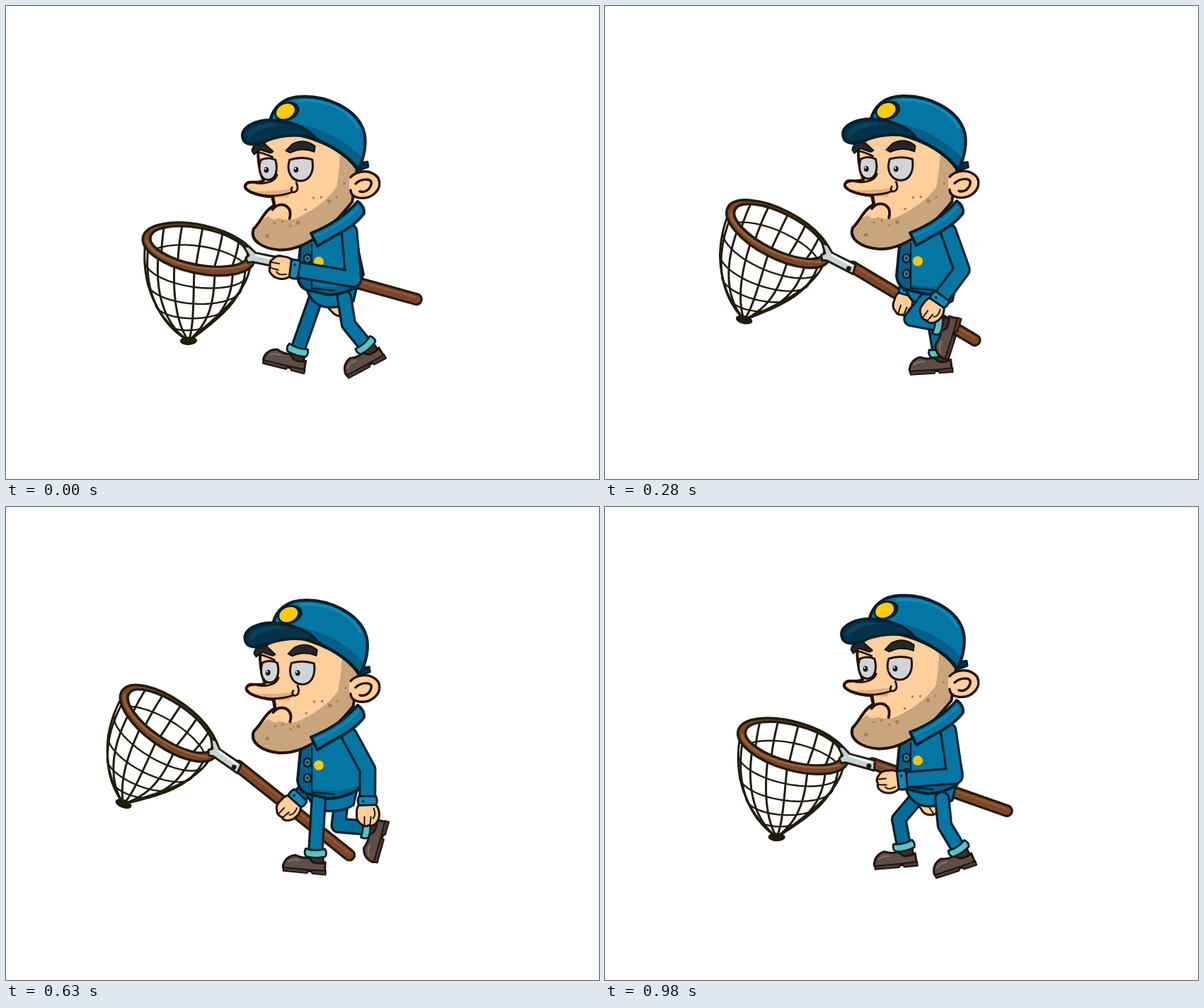
Animation, 838 px wide and 668 px high, one loop 1.05 s. Source, as an HTML page with a canvas:

```html
<!DOCTYPE html>
<html lang="en">
<head>
<meta charset="utf-8">
<title>Walking net man</title>
<style>
  html, body { margin: 0; width: 100%; height: 100%; overflow: hidden; background: #fff; }
  canvas { display: block; }
</style>
</head>
<body>
<canvas id="stage" width="838" height="668"></canvas>
<script>
const c = document.getElementById('stage').getContext('2d');
const STEP = 70, COUNT = 15, TAU = Math.PI * 2, RAD = Math.PI / 180;
const INK = '#06202c', BROWN = '#25120a', OLIVE = '#211d0b';
const BLUE = '#0476a4', LIGHT = '#1388b6', DEEP = '#045f89', NAVY = '#03324a';
const SKIN = '#fece9b', TAN = '#c9a57d', TEAL = '#5fc1bd', SHOE = '#5e4e48', WOOD = '#7d4628';

function draw(d, fill, line, width = 3) {
  const p = typeof d === 'string' ? new Path2D(d) : d;
  if (fill) { c.fillStyle = fill; c.fill(p, 'evenodd'); }
  if (line) { c.strokeStyle = line; c.lineWidth = width; c.stroke(p); }
}

function oval(x, y, rx, ry, deg, fill, line, width) {
  const p = new Path2D();
  p.ellipse(x, y, rx, ry, deg * RAD, 0, TAU);
  draw(p, fill, line, width);
}

function inside(clip, body) {
  c.save();
  c.clip(clip);
  body();
  c.restore();
}

function at(x, y, angle, body) {
  c.save();
  c.translate(x, y);
  c.rotate(angle);
  body();
  c.restore();
}

// Outlined tube, used for limbs and the handle
function tube(points, width, fill, line) {
  const d = 'M' + points.map(p => p.join()).join('L');
  draw(d, null, line, width);
  draw(d, null, fill, width - 6.5);
}

// Point on the bag: u goes round the rim, v runs from rim to tip
function bag(u, v) {
  const r = 1 - v ** 2.3, tilt = 0.34 * (1 - v);
  const x = 76 * r * Math.cos(u), y = 30 * r * Math.sin(u);
  return [262 - 32 * v + x * Math.cos(tilt) - y * Math.sin(tilt),
          338 + 128 * v + x * Math.sin(tilt) + y * Math.cos(tilt)];
}

function strand(point, width) {
  const pts = Array.from({ length: 25 }, (_, i) => point(i / 24).join());
  draw('M' + pts.join('L'), null, OLIVE, width);
}

function mesh(start, rows) {
  for (let i = 0; i <= 8; i++) strand(s => bag(start + Math.PI * i / 8, s), 3);
  for (const v of rows) strand(s => bag(start + Math.PI * s, v), 2.4);
}

function net(swing, bob) {
  const x = 258 - 115 * swing, y = 477 - 20 * swing - 65 * swing ** 2 + bob;
  at(x, y, (28.9 * swing - 7.9) * RAD, () => {
    c.translate(-230, -466);
    tube([[372, 372], [557, 452]], 18, WOOD, OLIVE);
    draw('M380 373L556 449', null, '#955834', 2.5);
    mesh(0, [0.2, 0.4, 0.6, 0.79]);
    oval(230, 466, 12, 6, 5, OLIVE);

    const hole = new Path2D(), ring = new Path2D();
    hole.ellipse(263, 336, 70, 26, 0.33, 0, TAU);
    ring.ellipse(262, 339.5, 80.5, 34, 0.35, 0, TAU);
    ring.addPath(hole);
    inside(hole, () => {
      c.fillStyle = '#fff';
      c.fillRect(180, 290, 170, 100);
      mesh(Math.PI, [0.2, 0.42]);
    });
    draw(ring, WOOD, OLIVE, 3.6);
    draw('M191 318C196 347 270 380 326 371', null, '#98603c', 3);

    draw('M325 344L333 346 341 356 376 368 374 382 335 368 328 368 326 361 331 358Z', '#c6d1d3', OLIVE, 3);
    draw('M341 359L370 370', null, '#f1f6f6', 3);
    oval(367, 375, 3.5, 3.5, 0, OLIVE);
  });
}

function hand(x, y, ex, ey) {
  at(x, y, Math.atan2(y - ey, x - ex), () => {
    draw('M-14 -11C-6 -19 6 -18 12 -13Q18 -9 16 -2Q19 4 14 9Q10 16 0 15Q-9 16 -14 11Z', SKIN, BROWN, 3);
    draw('M15 -4L4 -5M16 4L4 4M-8 -9Q2 -13 6 -8', null, BROWN, 2);
    draw('M-25 -12Q-19 -15 -13 -12L-12 12Q-19 15 -25 12Z', LIGHT, INK, 3);
    oval(-18, 6, 2, 2, 0, NAVY);
  });
}

// First half of the cycle swings the foot forward, second half pushes it back
function footstep(p) {
  if (p < 0.5) {
    const q = p * 2, lift = Math.sin(Math.PI * q ** 0.75) ** 1.5;
    return [460 + 48 * Math.cos(Math.PI * q) + 15 * Math.sin(Math.PI * q),
            479 + 7 * q - 38 * lift, 42 * q - 28 - 75 * lift];
  }
  const s = p * 2 - 1;
  return [412 + 96 * s * (1.4 - 0.4 * s),
          486 - 7 * s + 6 * Math.sin(Math.PI * s), 14 * (1 - s) ** 4 - 28 * s ** 3];
}

function leg(p, fill) {
  const [ax, ay, deg] = footstep(p);
  const hx = 458 + 20 * Math.cos(TAU * p), hy = 412, bone = 38;
  const dx = ax - hx, dy = ay - hy, d = Math.hypot(dx, dy);
  const bend = Math.sqrt(Math.max(0, bone ** 2 - d * d / 4)) / d;
  const kx = (hx + ax) / 2 - dy * bend, ky = (hy + ay) / 2 + dx * bend;

  tube([[hx, hy], [kx, ky], [ax, ay]], 22.5, fill, INK);
  at(ax, ay, deg * RAD, () => {
    draw('M-9 3L11 3 13 18-13 18Z', '#3c2f2b', BROWN, 3);
    draw('M-9 8Q-18 10-28 6Q-42 9-44 23L-43 27 16 27 15 12Q8 16-2 14Z', SHOE, BROWN, 3);
    draw('M-43 25L-43 30-9 30-8 27-3 27-2 30 17 30 17 24-6 25Z', '#4a3a35', BROWN, 2);
    draw('M-37 16Q-30 11-22 13', null, '#85736b', 2);
  });
  // The cuff follows the shin
  at(ax, ay, Math.atan2(ay - ky, ax - kx) - Math.PI / 2, () =>
    draw('M-14-5Q0-1 13-6Q17 0 14 5Q0 9-13 6Q-17 1-14-5Z', TEAL, INK, 2.8));
}

const FACE = new Path2D('M358 203C356 222 361 241 365 250C356 255 345 248 339 256C336 262 350 271 378 273' +
  'L380 285C366 291 360 309 350 318C344 334 362 346 386 348C424 350 460 318 490 281' +
  'L497 235C480 210 450 195 415 186C390 183 370 190 358 203Z');
const STUBBLE = new Path2D('M340 320L371 300Q376 308 386 303Q397 308 410 304Q450 286 468 260' +
  'Q474 230 473 200L510 220 510 360 340 360Z');
const CAP = new Path2D('M375 166C379 148 393 132 421 132C456 131 495 150 506 178C513 196 507 220 499 236' +
  'C484 214 458 200 420 183Z');
const EYES = 'M361 221Q372 216 382 221C386 236 382 249 371 249C360 248 357 233 361 221Z' +
  'M402 221Q418 216 434 221C437 240 429 251 417 251C403 250 397 236 402 221Z';

function face() {
  draw(FACE, SKIN);
  inside(FACE, () => {
    draw(STUBBLE, TAN);
    for (let i = 0; i < 11; i++) {
      const r = i % 4 ? 1.8 : 2.8;
      oval(369 + i * 11, 328 - i * 7 + 11 * Math.sin(i * 5), r, r, 0, '#a1835f');
    }
    draw('M340 264Q372 267 404 262L400 274 345 274Z', '#e2ad7c');
  });
  draw(FACE, null, BROWN, 4);
  draw('M382 240C382 253 363 256 350 252L353 263 392 262 400 240Z', SKIN);
  draw(EYES, '#d3d4d7', BROWN, 3);
  for (const x of [369, 411]) {
    oval(x, 235, 3.4, 4, 0, '#171717');
    oval(x - 1.2, 233.5, 1.2, 1.2, 0, '#fff');
  }
  draw('M384 242C381 253 363 256 350 252C340 249 335 258 341 263C356 273 384 274 404 267' +
    'M411 253Q416 265 407 267Q402 266 405 260M352 208Q366 211 378 217', null, BROWN, 2.8);
  draw('M377 291Q384 282 394 285Q405 290 401 304M377 274L379 284', null, BROWN, 3.8);
  draw('M349 208C350 198 361 194 367 198L379 209 375 211 360 206 352 213Z' +
    'M397 208L406 199Q423 190 438 202L437 210Q419 203 403 211Z', '#25262a', '#15100d', 2);
}

function cap() {
  draw('M499 227L512 225 513 232 500 237Z', NAVY, INK, 3);
  draw(CAP, BLUE);
  inside(CAP, () => {
    draw('M412 170C455 178 488 198 512 228L498 250 410 200Z', DEEP);
    draw('M415 138C455 135 487 152 499 176', null, LIGHT, 4);
  });
  draw(CAP, null, INK, 4.4);
  oval(399, 152.5, 18, 13, -20, INK);
  oval(397, 152.5, 13.5, 10, -25, '#fecb09');
  draw('M336 189C332 173 358 162 384 165C411 168 432 179 440 193C421 184 395 185 371 193C351 202 338 200 336 189Z', NAVY, INK, 4);
  draw('M342 185C349 170 376 166 397 172C375 172 354 177 345 191Z', '#05435f');
}

function ear() {
  draw('M485 246C494 237 515 233 526 247C533 262 518 278 498 275C490 273 486 268 485 262Z', SKIN);
  draw('M487 246C495 237 515 233 526 247C533 262 518 278 498 275C490 273 487 269 487 264' +
    'M494 255C503 247 519 247 516 256C514 264 507 268 500 266', null, BROWN, 3.4);
}

function jacket() {
  const shape = new Path2D('M416 344L412 386Q414 401 425 405L455 412Q476 412 497 400L505 383Q500 360 491 318L438 325Z');
  draw(shape, BLUE);
  inside(shape, () => {
    draw('M410 340L430 340 431 410 410 410Z', DEEP);
    draw('M433 398Q463 406 496 394L500 415 430 415Z', DEEP);
  });
  draw(shape, null, INK, 4);
  draw('M432 340L432 402M432 403L464 406', null, INK, 2.4);
  for (const y of [361, 383]) {
    oval(426, y, 5.2, 6, 0, '#44758a', INK, 2.6);
    oval(426, y, 1.6, 1.8, 0, INK);
  }
  oval(442, 365, 7, 7, 0, '#f3c713');
}

function collar() {
  draw('M431 325Q472 309 497 280Q507 287 506 297Q494 314 464 329L440 343Z', BLUE, INK, 4);
  draw('M437 329Q474 314 498 289', null, LIGHT, 2.5);
}

function arm(swing, bob) {
  const sx = 485, sy = 334 + bob, turn = (68 - 103 * swing) * RAD;
  const hx = sx - 103 * Math.sin(turn), hy = sy + 103 * Math.cos(turn);
  const ex = sx + 6 + 25 * swing, ey = sy + 56 - 24 * swing;
  const f = 22 / Math.hypot(ex - hx, ey - hy);
  tube([[sx, sy - 11], [ex, ey], [hx + (ex - hx) * f, hy + (ey - hy) * f]], 25, BLUE, INK);
  hand(hx, hy, ex, ey);
}

function farArm(swing, bob) {
  const x = 471 - 90 * swing, y = 425 + bob, sx = 435, sy = 388 + bob;
  tube([[sx, sy], [(x + sx) / 2, (y + sy) / 2]], 23, DEEP, INK);
  hand(x, y, sx, sy);
}

function paint(k) {
  c.fillStyle = '#fff';
  c.fillRect(0, 0, 838, 668);
  const p = k / COUNT;
  const swing = 1 - Math.abs(2 * p - 1);
  const bob = 4 * Math.cos((k - 1.9) * 2 * TAU / COUNT) - 4;
  const nod = (0.3 - 2 * Math.cos(p * TAU)) / 150;

  net(swing, bob);
  farArm(swing, bob);
  leg((p + 0.5) % 1, '#046c98');
  at(0, bob, 0, () => draw('M424 400Q429 424 450 429Q474 432 491 421L497 395Z', BLUE, INK, 3.4));
  leg(p, BLUE);

  at(0, bob, 0, jacket);
  at(430, 330 + bob, nod, () => {
    c.translate(-430, -330);
    face();
    cap();
  });
  at(0, bob, 0, ear);
  arm(swing, bob);
  at(0, bob, 0, collar);
}

c.lineJoin = c.lineCap = 'round';
const begin = performance.now();
function tick() {
  paint(Math.floor((performance.now() - begin) / STEP) % COUNT);
  requestAnimationFrame(tick);
}
tick();
</script>
</body>
</html>
```
